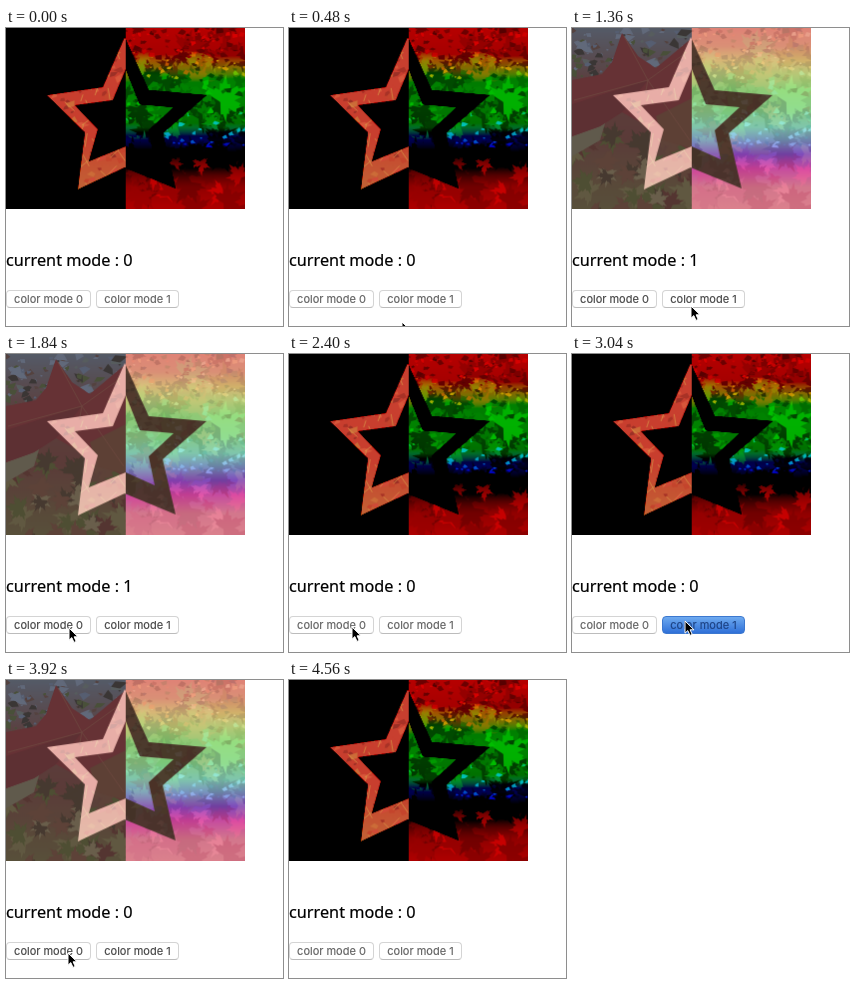
Animation, 277 px wide and 298 px high, one loop 4.64 s. Source, as an HTML page with a canvas:

```html
<!DOCTYPE html>
<html lang="en">
<head>
<meta charset="utf-8">
<title>Color modes</title>
<style>
html, body { margin: 0; width: 100%; height: 100%; overflow: hidden; background: #fff; }
#stage { position: relative; width: 277px; height: 298px; overflow: hidden; }
canvas { position: absolute; left: 0; top: 0; }
#label {
  position: absolute; left: 0; top: 220px; margin: 0; color: #000;
  font: 16.25px/24px "Noto Sans", sans-serif; white-space: pre;
  -webkit-text-stroke: 0.2px #000;
}
.button {
  position: absolute; top: 262px; height: 18px; box-sizing: border-box;
  border: 1px solid #d4d4d4; border-bottom-color: #bcbcbc; border-radius: 4px;
  background: #fff; color: #606060; text-align: center;
  font: 11px/16px Inter, sans-serif; white-space: pre;
  -webkit-text-stroke: 0.15px currentColor;
}
.lit .button { color: #444; }
#stage .pressed {
  color: #1d4384; border-color: #3c78cf;
  background: linear-gradient(#6eaaf0, #2f70d8);
}
#b0 { left: 0; width: 85px; }
#b1 { left: 90px; width: 83px; }
#cursor { position: absolute; left: 0; top: 0; overflow: visible; }
</style>
</head>
<body>
<div id="stage">
  <canvas id="view" width="240" height="181"></canvas>
  <p id="label">current mode : 0</p>
  <div class="button" id="b0">color mode 0</div>
  <div class="button" id="b1">color mode 1</div>
  <svg id="cursor" width="12" height="16">
    <path d="M0 0V12.2L2.8 9.6L5 14.4L7.2 13.4L5.1 8.8H9Z" fill="#000" stroke="#fff" stroke-width="1"/>
  </svg>
</div>
<script>
const W = 240, H = 180, MID = 120, LOOP = 4640, STEP = 80;
const $ = id => document.getElementById(id);

let seed = 29;
const rand = (a = 0, b = 1) => {
  seed = (seed * 16807) % 2147483647;
  return a + (b - a) * seed / 2147483647;
};
const pick = list => list[Math.floor(rand(0, list.length))];

function layer(paint) {
  const canvas = document.createElement('canvas');
  canvas.width = W;
  canvas.height = H;
  paint(canvas.getContext('2d'));
  return canvas;
}

function trace(c, points) {
  points.forEach(([x, y], i) => i ? c.lineTo(x, y) : c.moveTo(x, y));
  c.closePath();
}

function polygon(c, points, fill) {
  c.fillStyle = fill;
  c.beginPath();
  trace(c, points);
  c.fill();
}

function starPath(c) {
  c.beginPath();
  trace(c, [[119, 9], [143, 62], [201, 67], [157, 105], [170, 160], [119, 139],
    [72, 161], [79, 104], [41, 67], [97, 59]]);
  trace(c, [[120, 41], [134, 76], [168, 79], [143, 102], [149, 131], [120, 118],
    [83, 133], [92, 101], [69, 77], [107, 72]]);
}

function fillStar(c, fill) {
  c.fillStyle = fill;
  starPath(c);
  c.fill('evenodd');
}

function clipTo(c, x, w, paint) {
  c.save();
  c.beginPath();
  c.rect(x, 0, w, H);
  c.clip();
  paint();
  c.restore();
}

function fade(c, stops) {
  const g = c.createLinearGradient(0, 0, 0, H);
  stops.forEach(([p, color]) => g.addColorStop(p, color));
  return g;
}

// Five lobes with small side teeth, opening away from the stem.
function leaf(c, x, y, r, turn, fill) {
  const at = (a, d) => [x + Math.cos(a) * d, y + Math.sin(a) * d];
  const edge = [];
  for (let i = -2; i <= 2; i++) {
    const a = turn + i * 0.98, d = r * (1 - Math.abs(i) * 0.13);
    edge.push(at(a - 0.46, d * 0.42), at(a - 0.3, d * 0.67), at(a - 0.15, d * 0.63),
      at(a, d), at(a + 0.15, d * 0.63), at(a + 0.3, d * 0.67));
  }
  edge.push(at(turn + Math.PI, r * 0.12));
  polygon(c, edge, fill);
}

function shard(c, x, y, r, fill) {
  const a = rand(0, 6.28);
  polygon(c, [0, 1.5, 2.6, 4.4].map(k => {
    const d = r * rand(0.35, 1);
    return [x + Math.cos(a + k) * d, y + Math.sin(a + k) * d * 0.75];
  }), fill);
}

function shards(c, count, [x0, x1], [y0, y1], size, tones) {
  for (let i = 0; i < count; i++) shard(c, rand(x0, x1), rand(y0, y1), rand(2, size), pick(tones));
}

function leaves(c, count, [x0, x1], [y0, y1], size, tones) {
  for (let i = 0; i < count; i++) {
    leaf(c, rand(x0, x1), rand(y0, y1), rand(size * 0.4, size), rand(0, 6.28), pick(tones));
  }
}

// Fine veins running outward from the stem of the large leaf.
function veins(c, color) {
  c.strokeStyle = color;
  c.lineWidth = 0.8;
  c.beginPath();
  for (const [x, y] of [[2, 72], [52, 8], [118, 22], [118, 112], [68, 94]]) {
    c.moveTo(76, 52);
    c.lineTo(x, y);
  }
  c.stroke();
}

function paintLeft(c) {
  c.fillStyle = fade(c, [[0, '#8c9ab8'], [0.3, '#9a5a58'], [0.6, '#9a5048'], [1, '#94804e']]);
  c.fillRect(0, 0, MID, H);
  shards(c, 110, [0, MID], [0, 55], 10, ['#a9bce6', '#70804a', '#93a0a4', '#4e4440', '#8c6058', '#8fa4d0']);
  leaves(c, 45, [-5, MID], [108, 185], 24, ['#a8955c', '#7c7c3c', '#bca476', '#6a4a34', '#a06048', '#8c4038']);
  polygon(c, [[0, 96], [34, 92], [28, 112], [0, 128]], '#a89878');
  polygon(c, [[0, 52], [30, 46], [40, 34], [50, 5], [66, 28], [84, 40], [120, 10], [120, 122],
    [98, 112], [72, 96], [50, 84], [28, 98], [0, 108]], '#b63a42');
  polygon(c, [[76, 52], [0, 76], [0, 108], [28, 98], [50, 84]], '#a0343c');
  polygon(c, [[84, 88], [120, 70], [120, 120], [92, 112]], '#a05a40');
  veins(c, '#c8725c');
  c.save();
  starPath(c);
  c.clip('evenodd');
  c.fillStyle = fade(c, [[0, '#c84030'], [0.6, '#c83e2e'], [1, '#c07038']]);
  c.fillRect(0, 0, MID, H);
  shards(c, 120, [38, MID], [5, 165], 9, ['#a83226', '#d8563a', '#c4442c', '#cc6c38', '#9c3026', '#d04a38']);
  c.strokeStyle = '#d89a48';
  c.lineWidth = 0.7;
  c.beginPath();
  for (let i = 0; i < 50; i++) {
    const x = rand(38, MID), y = rand(10, 160);
    c.moveTo(x, y);
    c.lineTo(x + rand(-14, 14), y + rand(6, 16));
  }
  c.stroke();
  c.restore();
}

function paintRight(c) {
  const side = [MID, W], dark = ['#8c5038', '#5c5030', '#704830', '#807044', '#684c40'];
  c.fillStyle = fade(c, [[0, '#b87858'], [0.4, '#8c8858'], [0.7, '#7c7070'], [1, '#b07070']]);
  c.fillRect(MID, 0, MID, H);
  leaves(c, 50, side, [0, 135], 25, [...dark, '#a89868', '#b88058', '#98a060']);
  leaf(c, 223, 30, 25, -1.8, '#98703c');
  leaf(c, 218, 72, 30, -0.5, '#a4b470');
  leaf(c, 160, 78, 28, 0.3, '#70803c');
  shards(c, 130, side, [0, 50], 6, [...dark, '#d8a068', '#d0b088', '#c87850']);
  shards(c, 70, side, [45, 95], 7, [...dark, '#a8c0a0', '#88a070']);
  shards(c, 60, [150, W], [84, 118], 6, ['#b4c8d0', '#606048', '#a0c0c8', '#586858']);
  leaves(c, 22, side, [132, H], 24, ['#c07078', '#805050', '#a06068', '#cc8888', '#904850']);
  fillStar(c, 'rgba(108,48,22,.65)');
}

const photo = layer(c => {
  clipTo(c, 0, MID, () => paintLeft(c));
  clipTo(c, MID, MID, () => paintRight(c));
});

// White star on black beside a black star on a rainbow.
const overlay = lift => layer(c => {
  c.fillStyle = '#000';
  c.fillRect(0, 0, W, H);
  const bands = [[0, 0, 50], [0.1, 10, 50], [0.18, 45, 50], [0.26, 88, 50], [0.34, 120, 50],
    [0.46, 138, 48], [0.55, 168, 46], [0.62, 215, 44], [0.7, 265, 26], [0.78, 315, 26],
    [0.88, 342, 46], [1, 348, 50]];
  c.fillStyle = fade(c, bands.map(([p, hue, light]) => [p, `hsl(${hue}, 95%, ${light + lift}%)`]));
  c.fillRect(MID, 0, MID, H);
  clipTo(c, 0, MID, () => fillStar(c, '#fff'));
  clipTo(c, MID, MID, () => fillStar(c, '#000'));
});

const blend = (mode, alpha, lift, haze) => layer(c => {
  c.drawImage(photo, 0, 0);
  c.globalCompositeOperation = mode;
  c.globalAlpha = alpha;
  c.drawImage(overlay(lift), 0, 0);
  c.globalCompositeOperation = 'source-over';
  c.globalAlpha = haze;
  c.fillStyle = '#fff';
  c.fillRect(0, 0, W, H);
});
const pictures = [blend('color-burn', 1, 0, 0), blend('source-over', 0.53, 22, 0.1)];

const path = [[0, 112, 300], [400, 112, 300], [480, 113, 294], [720, 119, 277], [1360, 119, 278],
  [1440, 116, 279], [1840, 63, 274], [2400, 63, 273], [2880, 113, 267], [3440, 113, 267],
  [3680, 62, 273], [4240, 62, 273], [4560, -12, 277], [LOOP, -12, 277]];

function pointer(t) {
  const i = path.findIndex(p => p[0] > t);
  const [t0, x0, y0] = path[i - 1], [t1, x1, y1] = path[i];
  const k = (t - t0) / (t1 - t0), e = k * k * (3 - 2 * k);
  return [x0 + (x1 - x0) * e, y0 + (y1 - y0) * e];
}

const within = (t, ...spans) => spans.some(([a, b]) => t >= a && t < b);
const view = $('view').getContext('2d');

function draw(now) {
  const t = Math.floor(now % LOOP / STEP) * STEP;
  const mode = +within(t, [1040, 2160], [3120, 3920]);
  const shown = +within(t, [1040, 2240], [3120, 4000]);
  view.clearRect(0, 0, W, H + 1);
  view.drawImage(pictures[shown], 0, 0, W - 0.6, H + 0.5);
  $('label').textContent = 'current mode : ' + mode;
  $('stage').className = shown ? 'lit' : '';
  $('b0').classList.toggle('pressed', within(t, [1920, 2160], [3840, 3920]));
  $('b1').classList.toggle('pressed', within(t, [960, 1040], [3040, 3120]));
  const [x, y] = pointer(t);
  $('cursor').style.transform = `translate(${x}px, ${y}px)`;
}

const start = performance.now();
function tick() {
  draw(performance.now() - start);
  requestAnimationFrame(tick);
}
tick();
</script>
</body>
</html>
```
